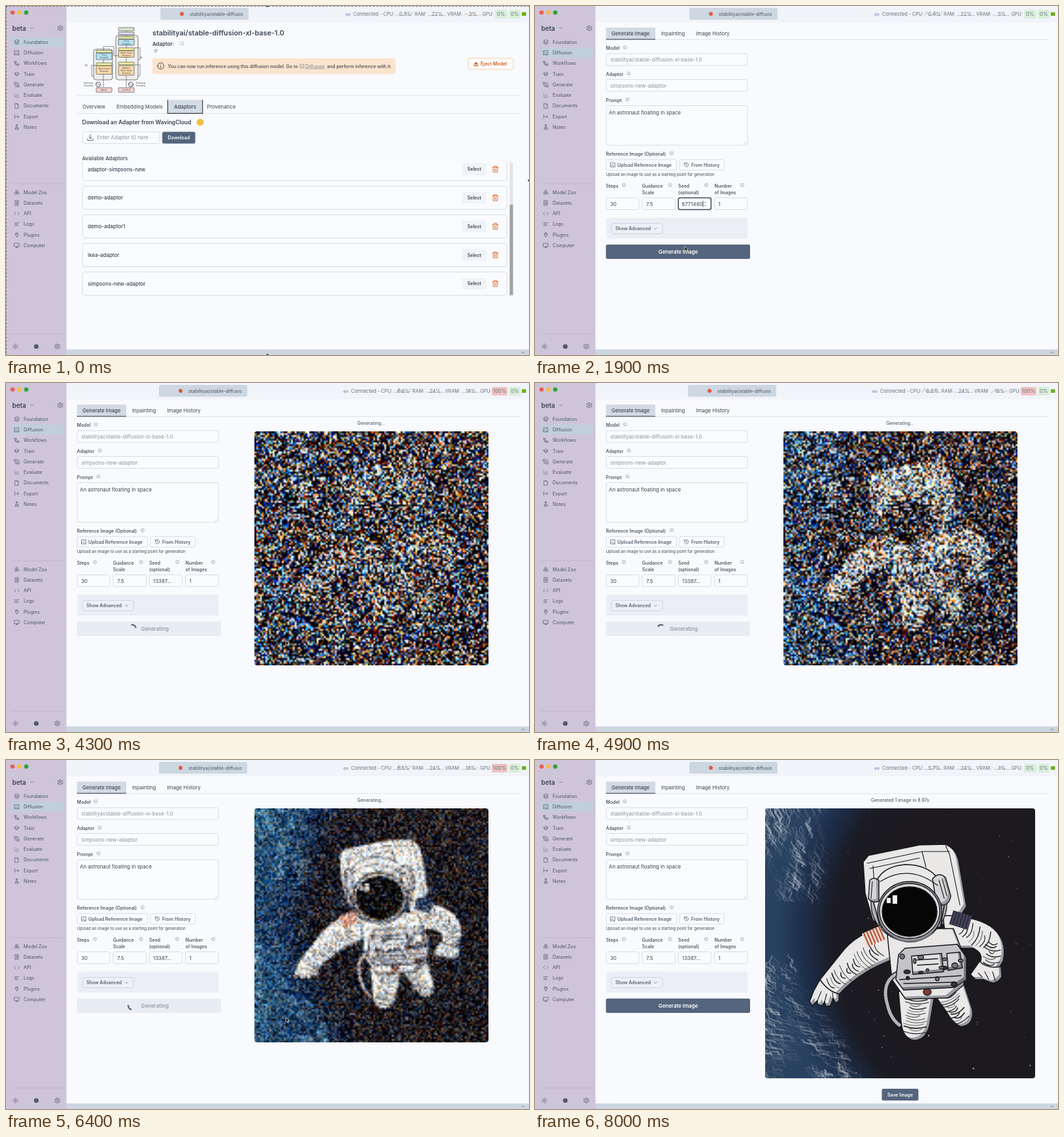
Recreate the animation shown at these times as an HTML page with a canvas. Size 800 by 534 pixels, loop 8100 ms.

```html
<!DOCTYPE html>
<html lang="en">
<head>
<meta charset="utf-8">
<title>Diffusion workspace</title>
<style>
html, body { margin: 0; width: 100%; height: 100%; overflow: hidden; background: #f9fafd; }
svg, canvas { position: absolute; left: 0; top: 0; display: block; }
svg { width: 800px; height: 534px; font-family: Inter, "Liberation Sans", sans-serif; color: #4f5a6b; }
text { white-space: pre; }
.i { fill: none; stroke: currentColor; stroke-width: 2; stroke-linejoin: round; stroke-linecap: round; }
#preview, #final { border-radius: 4px; top: 74px; }
#preview { left: 380px; width: 358px; height: 358px; }
#final { left: 352px; width: 413px; height: 413px; }
</style>
</head>
<body>
<svg id="ui" viewBox="0 0 800 534" fill="#3d4652"></svg>
<canvas id="preview" width="128" height="128"></canvas>
<canvas id="final" width="413" height="413"></canvas>
<svg id="top" viewBox="0 0 800 534">
  <g id="ants" fill="none">
    <path d="M0 .4H800M.4 0V534" stroke="#4b4b55" stroke-width=".8" stroke-dasharray="3 2.5"/>
    <path d="M398.5 .7h3M398.5 533.3h3M799.3 265.5v3" stroke="#333" stroke-width="1.4"/>
  </g>
  <path id="cursor" d="M0 0v7l1.7-1.5 1.2 2.7 1.3-.6-1.2-2.6H5.2z" fill="#111" stroke="#fff" stroke-width=".6"/>
</svg>
<script>
const LOOP = 8100, STEP = 100;
const NAV = 600, CLICK = 2100, NOISE = 4100, DONE = 7400;
const $ = id => document.getElementById(id);

// ---------- markup helpers ----------
const ICON = {
  layers: 'M12 2 2 7l10 5 10-5zM2 17l10 5 10-5M2 12l10 5 10-5',
  image: 'M3 3h18v18H3zM3 17l6-6 10 10M15 8h.1',
  flow: 'M3 3h7v7H3zM14 14h7v7h-7zM6 10v8h8',
  cap: 'M2 9l10-5 10 5-10 5zM6 11v6q6 4 12 0v-6',
  gen: 'M2 2h8v8H2zM14 14h8v8h-8zM14 5h5v5M5 14v5h5',
  chart: 'M3 3v18h18M8 17v-5M13 17V7M18 17v-8',
  file: 'M5 2h9l5 5v15H5zM14 2v5h5',
  out: 'M3 4v16M7 12h14M16 7l5 5-5 5',
  flask: 'M9 2h6M10 2v7L4 21h16L14 9V2M7 15h10',
  boxes: 'M12 3l4 2v5l-4 2-4-2V5zM7 12l4 2v5l-4 2-4-2v-5zM17 12l4 2v5l-4 2-4-2v-5z',
  sheet: 'M5 2h14v20H5zM9 8h6M9 12h6M9 16h6',
  code: 'M7 6l-6 6 6 6M17 6l6 6-6 6',
  lines: 'M3 6h18M3 12h12M3 18h15',
  plug: 'M9 2v6M15 2v6M6 8h12v4a6 6 0 0 1-12 0zM12 18v4',
  screen: 'M2 3h20v14H2zM8 21h8M12 17v4',
  sun: 'M8 12a4 4 0 1 0 8 0 4 4 0 1 0-8 0M12 1v3M12 20v3M1 12h3M20 12h3M4 4l2 2M18 18l2 2M4 20l2-2M18 6l2-2',
  gear: 'M9 12a3 3 0 1 0 6 0 3 3 0 1 0-6 0M10 2h4l1 3 3 1 3-1 1 4-2 3 2 3-1 4-3-1-3 1-1 3h-4l-1-3-3-1-3 1-1-4 2-3-2-3 1-4 3 1 3-1z',
  trash: 'M3 6h18M5 6v15h14V6M8 6V2h8v4M10 11v6M14 11v6',
  info: 'M2 12a10 10 0 1 0 20 0 10 10 0 1 0-20 0M12 17v-5M12 7.5h.1',
  load: 'M3 15v6h18v-6M7 10l5 5 5-5M12 15V2',
  back: 'M3 12a9 9 0 1 0 3-7L3 8M3 3v5h5M12 7v5l4 2',
  down: 'M6 9l6 6 6-6',
  up: 'M6 15l6-6 6 6',
  link: 'M9 8H7a4 4 0 0 0 0 8h2M15 8h2a4 4 0 0 1 0 8h-2M8 12h8',
  open: 'M18 13v8H3V6h8M14 3h7v7M21 3 10 14',
  tag: 'M8 4h14v16H8l-6-8zM12 9l5 6M17 9l-5 6'
};
const B = 'font-weight="600"', M = 'font-weight="500"', GREY = 'fill="#8d949f"', MID = 'text-anchor="middle"';
const LINE = 'stroke="#d3dae3" stroke-width=".9"';
const text = (x, y, s, z = 7, o = '') => `<text x="${x}" y="${y + z * .36}" font-size="${z}" ${o}>${s}</text>`;
const rect = (x, y, w, h, f, o = '', r = 2.5) => `<rect x="${x}" y="${y}" width="${w}" height="${h}" rx="${r}" fill="${f}" ${o}/>`;
const icon = (n, x, y, z = 8, c = '#4f5a6b') =>
  `<path class="i" d="${ICON[n]}" color="${c}" transform="translate(${x - z / 2} ${y - z / 2}) scale(${z / 24})"/>`;
const dot = (x, y, r, f) => `<circle cx="${x}" cy="${y}" r="${r}" fill="${f}"/>`;
const line = (d, c = '#dce2ea', w = .9) => `<path d="${d}" stroke="${c}" stroke-width="${w}" fill="none"/>`;
const group = (id, s) => `<g id="${id}">${s}</g>`;
const MODEL = 'stabilityai/stable-diffusion-xl-base-1.0';
const SEED = '1338771480', PROMPT = 'An astronaut floating in space';

function sidebar() {
  const main = ['layers Foundation', 'image Diffusion', 'flow Workflows', 'cap Train', 'gen Generate',
    'chart Evaluate', 'file Documents', 'out Export', 'flask Notes'];
  const tools = ['boxes Model Zoo', 'sheet Datasets', 'code API', 'lines Logs', 'plug Plugins', 'screen Computer'];
  const rows = (list, y0) => list.map((s, i) => {
    const [n, ...label] = s.split(' '), y = y0 + i * 16.27;
    return icon(n, 16.5, y, 8.5, n == 'chart' ? '#8b8799' : '#4f5a6b') + text(27, y, label.join(' '), 7.1, 'fill="#4a5565"');
  }).join('');
  return rect(0, 0, 92, 534, '#cfc5da', '', 0) + line('M92 0V534', '#c6c3d3', .8) +
    dot(10, 10, 3.3, '#ee5f56') + dot(20.5, 10, 3.3, '#f2bd3f') + dot(31, 10, 3.5, '#3fae49') +
    line('M29.5 10h3M31 8.5v3', '#1d6b2a', .7) +
    text(9.5, 34, 'beta', 9.9, B) + icon('down', 39.5, 34, 8) + icon('gear', 83, 34, 9) +
    `<rect id="active" x="8" width="80.5" height="16" rx="2.5" fill="#c1cedb"/>` +
    rows(main, 55.3) + line('M8 272H88M8 502H88', '#bdb4ca') + rows(tools, 285) +
    icon('sun', 14.5, 521, 9) + dot(46.3, 521, 3.6, '#4f5a6b') + icon('gear', 78.5, 521, 9);
}

function header() {
  const c = 'fill="#66717f"';
  return rect(92, 0, 708, 25, '#f1f4f9', '', 0) + rect(92, 525.5, 708, 8.5, '#ccd6e1', '', 0) + icon('up', 791, 530, 8) +
    group('pill', rect(236, 3, 135, 18, '#cdd7e1') + dot(269, 12, 3, '#df5a43') + text(281, 12.7, 'stabilityai/stable-diffusio', 7, 'fill="#4a5460"')) +
    group('stats', icon('link', 523, 13, 8.5, '#6a7fb0') + text(531, 12.5, 'Connected -', 7.5, c) +
      text(577, 12.5, 'CPU:', 7.2, c) + text(625, 12.5, 'RAM:', 7.2, c) +
      text(675, 12.5, 'VRAM:', 7.2, c) + text(728.5, 12.5, 'GPU:', 7.2, c) +
      `<g fill="none" stroke-width=".7" opacity=".8"><path id="cpuLine" stroke="#86a388"/><path id="ramLine" stroke="#9aa3ad"/><path id="vramLine" stroke="#c79a84"/></g>` +
      ['cpu 611', 'ram 659.5', 'vram 714'].map(s => {
        const [id, x] = s.split(' ');
        return text(x, 12.5, '', 7.7, `id="${id}" ${MID} ${c}`);
      }).join('')) +
    `<rect id="gpuBox" y="6" height="13" rx="2"/>` + text(757, 12.7, '', 7.7, `id="gpu" ${MID} fill="#65736d"`) +
    rect(769.5, 6, 17.5, 13, '#d8eedb', '', 2) + text(778.3, 12.7, '0%', 7.7, `${MID} fill="#65736d"`) +
    rect(789, 9.5, 6.5, 5.5, '#6fae1f', '', 0);
}

// small block diagram in the model card
function diagram() {
  const box = (x, y, h, f, w = 24) => rect(x, y, w, h, f, 'stroke="#333" stroke-width=".6"', 1);
  const yel = '#eef0a2', org = '#fbd9a8', blu = '#b5e2f0', pink = '#f7d3d4';
  const tiny = (x, y, a) => a.map((s, i) => text(x, y + i * 4, s, 3.2, MID)).join('');
  return rect(134, 66, 29, 47, '#efefef', 'stroke="#444" stroke-width=".7"', 4) + rect(168, 45, 34, 68, '#efefef', 'stroke="#444" stroke-width=".7"', 4) +
    line('M149 124V66M184 124V33M149 66V62H165V76H172M134 107H131V91H138M202 107H205V90H196M202 82H205V64H196', '#444', .6) +
    box(172, 33, 5, '#d5e8cf') + box(172, 40, 4, '#dcdff0') + box(172, 47, 3.5, yel) + box(172, 51, 9, blu) +
    box(172, 64, 4, yel) + box(172, 68.5, 10, org) + box(172, 86, 4, yel) + box(172, 91, 15, org) +
    box(138, 68, 3.5, yel) + box(138, 72, 10, blu) + box(138, 87, 4, yel) + box(138, 91.5, 13, org) +
    box(138, 125, 7, pink) + box(172, 125, 7, pink) +
    [141, 191].map(x => `<circle cx="${x}" cy="120" r="3.6" fill="#fff" stroke="#333" stroke-width=".8"/>` + line(`M${x - 3} 120q1.5-3 3 0t3 0`, '#333', .6)).join('') +
    tiny(184, 54, ['Feed', 'Forward']) + tiny(184, 71.5, ['Multi-Head', 'Attention']) + tiny(184, 94.5, ['Masked', 'Multi-Head', 'Attention']) +
    tiny(150, 75, ['Feed', 'Forward']) + tiny(150, 96, ['Multi-Head', 'Attention']) +
    tiny(126, 118, ['Positional', 'Encoding']) + tiny(206, 118, ['Positional', 'Encoding']) +
    tiny(123, 91, ['Nx']) + tiny(207, 79, ['Nx']) + tiny(150, 128.5, ['INPUT']) + tiny(184, 128.5, ['OUTPUT']);
}

function foundation() {
  const names = ['adaptor-simpsons-new', 'demo-adaptor', 'demo-adaptor1', 'ikea-adaptor', 'simpsons-new-adaptor'];
  const cards = names.map((n, i) => {
    const y = 249.8 + i * 43.75;
    return rect(117, y - 17.8, 649, 35.4, '#fafbfe', LINE, 3) + text(125, y, n, 7.9, M) +
      rect(698, y - 9, 37, 18, '#f0f3f8') + text(716.4, y, 'Select', 7, `${B} ${MID}`) + icon('trash', 748.5, y, 11.5, '#dc6a2b');
  }).join('');
  return diagram() + text(224, 41, MODEL, 10.8, B) + text(224, 58.5, 'Adaptor:', 7.9, B) +
    icon('tag', 268.5, 57.5, 7.5, '#b4bac3') + icon('open', 229, 68.5, 5.5) +
    rect(224, 80, 372, 24, '#fbe4cd') + icon('info', 236.7, 91.7, 11.5, '#4b3a2c') +
    text(247.5, 92, 'You can now run inference using this diffusion model. Go to', 7, M) +
    icon('image', 453, 92, 7.5, '#7b8796') + text(458, 92, 'Diffusion', 7, 'fill="#7b8796" text-decoration="underline"') +
    text(491, 92, 'and perform inference with it.', 7, M) +
    rect(707, 80, 69, 17, '#fdfcfb', 'stroke="#efc9a5" stroke-width=".9"') +
    '<path d="M715.5 89.5l3.5-4 3.5 4zM715.5 90.7h7v1.4h-7z" fill="#cf5d1b"/>' + text(726, 88.7, 'Eject Model', 7.1, `${B} fill="#cf5d1b"`) +
    line('M108 136.5H785M108 164.5H785') +
    rect(247, 143.5, 54, 21, '#d3dbe5', '', 0) + line('M247.4 143.5V164.4H300.6V143.5', '#3a3f48', 1.2) +
    text(117, 154, 'Overview', 7.8) + text(169, 154, 'Embedding Models', 7.8) + text(257, 154, 'Adaptors', 7.8, M) + text(307.5, 154, 'Provenance', 7.8) +
    text(116.5, 178, 'Download an Adapter from WavingCloud', 8.5, B) + dot(297, 178, 5.4, '#f6bd42') +
    rect(117, 192.5, 118, 18, '#fafbfe', LINE) + icon('load', 129, 201.5, 11) + text(139, 201.7, 'Enter Adapter ID here', 7.75, GREY) +
    rect(239, 192.5, 50.5, 18, '#55657d') + text(264.3, 201.7, 'Download', 6.9, `${B} ${MID} fill="#fff"`) +
    text(116.5, 233, 'Available Adaptors', 7.8, M) +
    `<clipPath id="listClip"><rect x="110" y="239" width="670" height="204"/></clipPath><g clip-path="url(#listClip)">${cards}</g>` +
    rect(770.5, 239, 5, 203.5, '#e4e4e6', '', 0) + rect(770.5, 304, 5, 138.5, '#a2a2a4', '', 0);
}

function generator() {
  const label = (x, y, s, ix) => text(x, y, s, 7, M) + icon('info', ix, y - 1, 6.2, '#77808c');
  const field = (x, y, w, h, o = LINE) => rect(x, y, w, h, '#fafbfe', o);
  return rect(108.5, 33, 75.5, 18, '#d2dae4', '', 0) + line('M108 51.5H785') + line('M108.5 51H184', '#343a42', 1.1) +
    text(117, 42, 'Generate Image', 7.7, M) + text(193, 42, 'Inpainting', 7.8) + text(246.5, 42, 'Image History', 7.8) +
    label(108.5, 64.3, 'Model', 137.5) + field(109, 73, 216, 18) + text(115, 82, MODEL, 7.8, GREY) +
    label(108.5, 104.3, 'Adaptor', 143.5) + field(109, 112.5, 216, 18) + text(115, 121.7, 'simpsons-new-adaptor', 7.8, GREY) +
    label(108.5, 144, 'Prompt', 141.5) + field(109, 152.5, 216, 60.5) + text(113, 163, '', 7.8, 'id="prompt"') + line('M320 211.5l3-3', '#aaa', .6) +
    label(108.5, 226.3, 'Reference Image (Optional)', 209) +
    field(109, 235, 107.5, 16) + icon('image', 119, 243, 8.5) + text(126, 243, 'Upload Reference Image', 7, `${B} fill="#55606e"`) +
    field(221, 235, 68.5, 16) + icon('back', 231.5, 243, 8.5) + text(239, 243, 'From History', 7, `${B} fill="#55606e"`) +
    text(108.5, 257.3, 'Upload an image to use as a starting point for generation', 6.2) +
    label(108.5, 275, 'Steps', 136) + label(163.7, 275, 'Guidance', 206.7) + text(163.7, 285.3, 'Scale', 7, M) +
    label(219, 275, 'Seed', 262) + text(219, 285.3, '(optional)', 7, M) + label(274.5, 275, 'Number', 317) + text(274.5, 285.3, 'of Images', 7, M) +
    field(109, 293.5, 50, 18) + text(115, 302.8, '30', 7.9) + field(164, 293.5, 50.5, 18) + text(170, 302.8, '7.5', 7.9) +
    field(219.3, 293.5, 50, 18, 'id="seedBox"') + field(274.7, 293.5, 50.3, 18) + text(280.5, 302.8, '1', 7.9) +
    `<clipPath id="seedClip"><rect x="225" y="294" width="32" height="17"/></clipPath><g clip-path="url(#seedClip)">${text(225, 302.8, '', 7.9, 'id="seed"')}</g>` +
    group('focus', line('M257 298V307.5', '#222', .8) + icon('up', 260.3, 300.5, 6, '#222') + icon('down', 260.3, 305.5, 6, '#222')) +
    rect(109, 324, 216, 32, '#ebeff5', '', 1) + rect(117, 332.7, 78, 15.8, '#edf1f7', 'stroke="#c9d2de" stroke-width=".9"') +
    text(123, 340.7, 'Show Advanced', 6.9, `${B} fill="#55606e"`) + icon('down', 184.5, 340.7, 8) +
    group('ready', rect(108.5, 365, 220.5, 22, '#55657d') + text(219, 376.2, 'Generate Image', 7.9, `${B} ${MID} fill="#fff"`)) +
    group('busy', rect(108.5, 365, 220.5, 22, '#e8ecf3') + text(227.7, 376.2, 'Generating', 7.9, `${B} ${MID} fill="#979ea9"`) +
      `<path id="spin" d="M188.76 371.76A6 6 0 0 1 197.24 371.76" fill="none" stroke="#4f5e76" stroke-width="2.1"/>`) +
    text(558.5, 61.2, '', 7, `id="status" ${MID}`) +
    group('save', rect(530.5, 503, 56, 18, '#55657d') + text(558.5, 512.3, 'Save Image', 7, `${B} ${MID} fill="#fff"`));
}

$('ui').innerHTML = rect(0, 0, 800, 534, '#f9fafd', '', 0) + header() + sidebar() + group('foundation', foundation()) + group('generator', generator());

// ---------- astronaut picture ----------
function random(seed) {
  return () => {
    seed = seed + 0x6D2B79F5 | 0;
    let v = Math.imul(seed ^ seed >>> 15, 1 | seed);
    v = v + Math.imul(v ^ v >>> 7, 61 | v) ^ v;
    return ((v ^ v >>> 14) >>> 0) / 4294967296;
  };
}
const INK = '#19181c', SUIT = '#e9e8e7', SHADE = '#9a9aa2';

function paintScene(g) {
  const rnd = random(11);
  const sky = g.createRadialGradient(420, 195, 270, 420, 195, 470);
  [[0, '#1c1a1f'], [.24, '#1b1b24'], [.42, '#1c2a44'], [.65, '#26405f'], [1, '#2c4560']].forEach(s => sky.addColorStop(...s));
  g.fillStyle = sky;
  g.fillRect(0, 0, 413, 413);
  g.lineCap = g.lineJoin = 'round';

  // wavy cloud wisps along the planet's curve, gathered into bands
  for (let i = 0; i < 1500; i++) {
    const r0 = 345 + 145 * rnd(), a0 = Math.PI + (rnd() < .5 ? .13 + .55 * rnd() : -.12 - .58 * rnd());
    const band = .5 + .5 * Math.sin(a0 * 17 + r0 * .11 + 2 * Math.sin(r0 * .05));
    const fade = Math.min(1, (r0 - 340) / 40), span = .02 + .05 * rnd(), phase = 6 * rnd();
    g.strokeStyle = `rgba(208,213,219,${fade * band * (.1 + .5 * rnd())})`;
    g.lineWidth = .5 + 3.2 * rnd() * rnd();
    g.beginPath();
    for (let k = 0; k <= 6; k++) {
      const a = a0 + span * k / 6, r = r0 + 18 * Math.sin(a * 9) + 3 * Math.sin(k * 1.3 + phase) + k * 1.5;
      g.lineTo(420 + r * Math.cos(a), 195 + r * Math.sin(a));
    }
    g.stroke();
  }
  g.fillStyle = '#c9c6c4';
  for (let i = 0; i < 75; i++) {
    const s = .5 + rnd() * rnd() * 1.5;
    g.fillRect(125 + rnd() * 285, rnd() * 410, s, s);
  }

  // shape with a hard shadow on its lower right edge
  const part = (d, light = SUIT, dark = SHADE, off = 4) => {
    const p = new Path2D(d);
    g.save();
    g.fillStyle = dark; g.fill(p);
    g.clip(p); g.translate(-off, -off);
    g.fillStyle = light; g.fill(p);
    g.restore();
    g.strokeStyle = INK; g.lineWidth = 1.5; g.stroke(p);
  };
  const oval = (x, y, rx, ry, f, rot = 0) => {
    g.beginPath(); g.ellipse(x, y, rx, ry, rot, 0, 7);
    g.fillStyle = f; g.fill(); g.strokeStyle = INK; g.lineWidth = 1.3; g.stroke();
  };
  const ink = (d, w = 1.1, c = INK) => { g.strokeStyle = c; g.lineWidth = w; g.stroke(new Path2D(d)); };
  const folds = (x1, y1, x2, y2, w, n) => {
    const l = Math.hypot(x2 - x1, y2 - y1), ux = (x2 - x1) / l, uy = (y2 - y1) / l;
    for (let i = 0; i < n; i++) {
      const x = x1 + (x2 - x1) * i / n, y = y1 + (y2 - y1) * i / n, a = w * (.3 + .7 * rnd()), b = w * (.2 + .8 * rnd());
      ink(`M${x - uy * a} ${y + ux * a}Q${x + ux * 6} ${y + uy * 6} ${x + uy * b} ${y - ux * b}`, .6 + rnd());
    }
  };

  part('M150 82 158 72 236 56 276 55Q292 62 296 80L308 150 290 178 165 172 153 130Z');
  ink('M156 84 240 66 282 66M240 66 246 90M160 92 236 76M276 57 282 70 298 148M165 88 168 128');
  // legs
  part('M204 280 260 280 252 328Q248 354 228 355 210 352 208 326Z');
  part('M254 278 304 268 317 308Q320 332 300 334 288 330 278 312Z');
  folds(231, 288, 229, 346, 20, 14);
  folds(278, 284, 300, 328, 18, 13);
  // arms
  part('M186 180Q140 190 116 222L84 262Q92 280 112 286 135 260 170 242L206 226Z');
  folds(172, 214, 98, 274, 18, 17);
  part('M84 262 74 280 68 296 72 302 80 294 80 300 87 302 91 296 93 303 100 302 104 290 108 298 113 294 113 284Q96 280 84 262Z');
  ink('M80 294 86 280M91 296 94 284M104 290 103 282');
  part('M272 164Q318 164 344 180 372 200 364 234L354 250Q338 250 328 238 336 222 318 214L278 214Z');
  folds(300, 186, 344, 206, 18, 8);
  folds(350, 206, 344, 242, 14, 8);
  part('M328 234Q340 246 361 242L362 258Q354 270 344 266L334 262 322 262 314 254Z');
  ink('M326 252 332 258M336 250 342 262M348 250 352 264');
  // torso and control pack
  part('M186 184 288 184 306 230 304 270 280 290 215 292 194 262Z');
  g.setLineDash([3, 2]);
  ink('M208 250Q176 262 187 300 192 322 206 332', 8);
  ink('M208 250Q176 262 187 300 192 322 206 332', 5, '#b5b4b8');
  g.setLineDash([]);
  part('M204 224 214 214 294 208 308 228 308 262 290 274 212 278 200 262Z', '#c4c4c8', '#77777f');
  part('M224 226 270 222 273 250 226 254Z', '#e2e2e2', '#8b8b92');
  part('M278 222 298 220 302 244 280 248Z', '#d7d7d8', '#7d7d85');
  for (let i = 0; i < 15; i++) {
    const x = 207 + 96 * rnd(), y = 220 + 50 * rnd();
    oval(x, y, 2 + 3 * rnd(), 2 + 2 * rnd(), i % 3 ? '#77777f' : '#33343a');
  }
  ink('M206 262 300 256M212 268 290 266M232 232 264 230M233 240 265 238', 1.4);
  oval(248, 281, 6, 5, '#7d3c35');
  // helmet
  oval(220, 145, 58, 58, '#b0b0b6');
  part('M165 140Q164 90 214 86 268 86 276 138L268 182 176 182Z');
  part('M256 108Q266 96 276 106L284 134Q282 148 270 148L260 132Z', '#d5d5d7');
  part('M160 110Q166 104 174 110L174 142Q164 146 158 138Z', '#d5d5d7');
  ink('M266 110 274 138M271 108 278 134M164 112 162 138');
  ink('M176 112Q220 84 264 118', 1.2);
  oval(221, 158, 49, 46, '#8e8f97');
  oval(221, 157, 46, 42, '#dddcdc');
  oval(221, 158, 42, 38, '#060607');
  g.fillStyle = '#f4f4f2';
  g.fillRect(186, 137, 6, 8);
  g.fillRect(195, 133, 7, 13);
  ink('M190 192Q222 218 258 190', 2, '#6c6d75');
  // sleeve patches
  const patch = (x, y, rot, f, stripes) => {
    g.save();
    g.translate(x, y); g.rotate(rot);
    g.fillStyle = f; g.fillRect(-15, -11, 30, 22);
    g.fillStyle = stripes;
    for (let i = 0; i < 6; i++) g.fillRect(-13 + i * 5, -11, 2.4, 22);
    g.restore();
  };
  patch(166, 196, -.4, '#f0e4d4', '#b9553f');
  patch(299, 171, .3, '#2b2f47', '#4a4654');
}

const N = 128;
const full = $('final').getContext('2d');
paintScene(full);
const small = $('preview').getContext('2d', { willReadFrequently: true });
small.imageSmoothingQuality = 'high';
small.drawImage($('final'), 0, 0, N, N);
const clean = small.getImageData(0, 0, N, N).data;
const pixels = small.createImageData(N, N);
// grain varies in brightness and between warm and cool, hardly towards green
const grain = new Float32Array(N * N * 3);
{
  const rnd = random(77), bell = () => (rnd() + rnd() + rnd() + rnd() - 2) * 1.73;
  for (let i = 0; i < grain.length; i += 3) {
    const light = bell() * .9, warm = bell() * .5, green = bell() * .12;
    grain[i] = light + warm;
    grain[i + 1] = light + green;
    grain[i + 2] = light - warm;
  }
}

function paintNoise(t) {
  const sigma = track(t, [[NOISE, 160], [4900, 125], [5800, 60], [7000, 20], [DONE, 12]]);
  const keep = track(t, [[NOISE, .2], [4900, .72], [5800, 1], [7000, 1]]);
  const d = pixels.data, tint = [.8, 1.08, 1.12];
  for (let i = 0, j = 0; i < d.length; i += 4) {
    const blue = clean[i + 2] > clean[i] + 12;
    for (let c = 0; c < 3; c++) d[i + c] = clean[i + c] * keep * (blue ? tint[c] : 1) + 40 * (1 - keep) + grain[j++] * sigma;
    d[i + 3] = 255;
  }
  small.putImageData(pixels, 0, 0);
}

// ---------- timeline ----------
function track(t, keys) {
  let a = keys[0];
  for (const b of keys) {
    if (t < b[0]) return t <= a[0] ? a[1] : a[1] + (b[1] - a[1]) * (t - a[0]) / (b[0] - a[0]);
    a = b;
  }
  return a[1];
}
const PATH = [[100, 765, 385], [300, 716, 427], [400, 716, 427], [600, 44, 72], [800, 200, 180], [1100, 200, 180],
  [1300, 244, 303], [1700, 244, 303], [1900, 229, 368], [2200, 229, 368], [2600, 428, 394]];
// time, CPU, RAM, VRAM, GPU
const LOADS = [[0, '0.3', 22, 3, 0], [1000, '0.4', 22, 3, 0], [2500, '4.1', 23, 9, 0], [3100, '16.2', 24, 17, 0],
  [NOISE, '6.6', 24, 18, 100], [5400, '6.5', 24, 18, 100], [6500, '6.6', 24, 35, 93], [DONE, '5.7', 24, 3, 0]];

const show = (id, on) => { $(id).style.display = on ? '' : 'none'; };
const set = (id, attrs) => { for (const k in attrs) $(id).setAttribute(k, attrs[k]); };
const say = (id, s) => { if ($(id).textContent !== s) $(id).textContent = s; };

function spark(x, w, tick, high) {
  let d = '';
  for (let i = 0; i < 10; i++) {
    const v = random((tick + i) * 31 + x)();
    d += `${i ? 'L' : 'M'}${x + i * w / 9} ${14.5 - (v > .82 ? high * v : v * .5)}`;
  }
  return d;
}

function render(t) {
  const gen = t >= NAV, busy = t >= CLICK && t < DONE, done = t >= DONE;
  show('foundation', !gen);
  show('generator', gen);
  show('ants', !gen);
  set('active', { y: gen ? 63.6 : 47.3 });

  const [, cpu, ram, vram, gpu] = LOADS.filter(l => l[0] <= t).pop();
  say('cpu', cpu + '%'); say('ram', ram + '%'); say('vram', vram + '%'); say('gpu', gpu + '%');
  const wide = gpu == 100, tick = Math.floor(t / 400);
  set('pill', { transform: `translate(${wide ? -2 : 0})` });
  set('stats', { transform: `translate(${wide ? -3.2 : 0})` });
  set('gpuBox', { x: wide ? 743 : 748, width: wide ? 24 : 18.5, fill: wide ? '#efc3c5' : gpu ? '#f1d2d5' : '#d8eedb' });
  set('gpu', { x: wide ? 755 : 757.2 });
  set('cpuLine', { d: spark(596, 27, tick, 7) });
  set('ramLine', { d: spark(645, 28, 3, 0) });
  set('vramLine', { d: spark(700, 27, tick, 4) });

  say('prompt', PROMPT.slice(0, Math.round(track(t, [[700, 0], [1200, PROMPT.length]]))));
  const focus = t >= 1300 && t < CLICK, typed = SEED.slice(0, Math.round(track(t, [[1300, 0], [1700, 10]])));
  const tail = focus && typed.length > 6;
  say('seed', t >= CLICK ? '13387...' : typed);
  set('seed', { x: tail ? 256.5 : 225, 'text-anchor': tail ? 'end' : 'start' });
  set('seedBox', { stroke: focus ? '#414a59' : '#d3dae3', 'stroke-width': focus ? 1.5 : .9 });
  show('focus', focus);

  show('ready', !busy);
  show('busy', busy);
  set('spin', { transform: `rotate(${(t - 3600) * 1.125 - 35} 193 376)` });
  say('status', busy ? 'Generating...' : done ? 'Generated 1 image in 8.97s' : '');
  show('save', done);
  show('final', done);
  const noisy = t >= NOISE && !done;
  show('preview', noisy);
  if (noisy) paintNoise(t);

  show('cursor', t >= 100 && !done);
  const axis = k => track(t, PATH.map(p => [p[0], p[k]]));
  set('cursor', { transform: `translate(${axis(1)} ${axis(2)})` });
}

let last = -1;
function loop() {
  const t = Math.floor(performance.now() % LOOP / STEP) * STEP;
  if (t !== last) render(last = t);
  requestAnimationFrame(loop);
}
loop();
</script>
</body>
</html>
```
